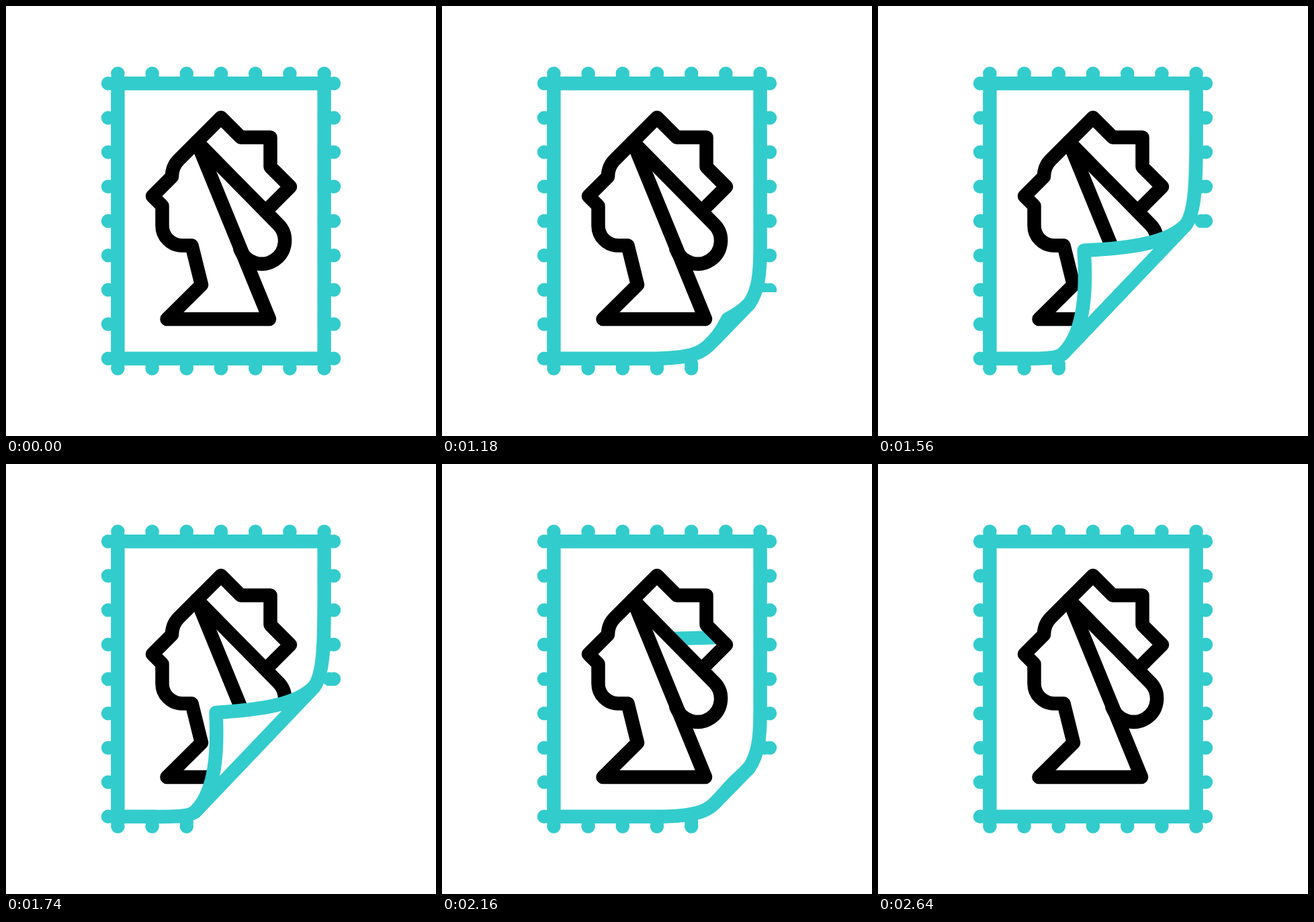
These frames come from a looping animation (640x640 px, 3600 ms). An HTML page without scripts:

```html
<!DOCTYPE html>
<html lang="en">
<head>
<meta charset="utf-8">
<title>Peeling stamp</title>
<style>
  html, body { margin: 0; width: 100%; height: 100%; overflow: hidden; background: #fff; }
  svg { display: block; width: 100%; height: 100%; }

  .line { fill: none; stroke: #3cc; stroke-width: 20.5; stroke-linejoin: round; }
  .perforation { stroke-linecap: round; stroke-dasharray: 0 51.2; }
  .head { stroke: #000; stroke-linecap: round; }
  .flap, .cover { fill: #fff; }

  /* Four poses of the corner: flat, curl, fold, peak */
  .edge {
    --flat: path("M166.4 115.2H473.6V470C473.6 500 473.6 515 473.6 524.8L473.6 524.8C465 524.8 440 524.8 420 524.8H166.4Z");
    --curl: path("M166.4 115.2H473.6V370C473.6 405 471 432 457 452L416 494C398 513 392 525 315 524.8H166.4Z");
    --fold: path("M166.4 115.2H473.6V280C473.6 330 472 352 461 367L318 517C306 528 275 524.8 240 524.8H166.4Z");
    --peak: path("M166.4 115.2H473.6V190C473.6 260 472 305 458 324L273 518C262 526 235 524.8 195 524.8H166.4Z");
  }
  .flap {
    --flat: path("M473.6 524.8C473.6 524.8 473.6 524.8 473.6 524.8C473.6 524.8 473.6 524.8 473.6 524.8Z");
    --curl: path("M457 452C450 460 440 468 435 473C430 478 422 487 416 494Z");
    --fold: path("M461 367C440 390 402 397 347 406C343 450 340 497 318 517Z");
    --peak: path("M458 324C432 350 380 359 305 362C309 420 307 485 273 518Z");
  }
  /* Blank area left behind by the lifted corner */
  .cover {
    --flat: path("M474 512H510V560H484V525Z");
    --curl: path("M460 434H510V560H392V510Z");
    --fold: path("M468 360H510V560H305V524Z");
    --peak: path("M451 332H510V560H281V510Z");
  }

  .peel { d: var(--flat); animation: peel 3.6s linear infinite; }
  .cover { animation: peel 3.6s linear infinite, lifted 3.6s step-end infinite; }
  .band {
    d: path("M342 260L412 258");
    animation: swing 3.6s linear infinite, glimpse 3.6s step-end infinite;
  }

  @keyframes peel {
    0%, 25.83%, 70.56%, 100% { d: var(--flat); }
    32.2% { d: var(--curl); }
    37.78% { d: var(--fold); animation-timing-function: ease-out; }
    44.4% { d: var(--peak); }
    46.1% { d: var(--peak); animation-timing-function: ease-in; }
    52.36% { d: var(--fold); }
    60% { d: var(--curl); }
  }
  @keyframes lifted {
    0%, 70.56%, 100% { visibility: hidden; }
    26.1% { visibility: visible; }
  }
  @keyframes swing {
    0%, 60.1% { d: path("M342 260L412 258"); animation-timing-function: ease-in; }
    73.3%, 100% { d: path("M348 227L451 133"); }
  }
  @keyframes glimpse {
    0%, 73.3%, 100% { visibility: hidden; }
    58.9% { visibility: visible; }
  }
</style>
</head>
<body>
<svg viewBox="0 0 640 640">
  <g class="line">
    <path class="perforation" d="M166.4 100.6H474M166.4 539.4H474M152 115.2V525M488 115.2V525"/>
    <path class="perforation" d="M166.4 107H474M166.4 533H474M159 115.2V525M481 115.2V525"/>
    <path class="band"/>
  </g>
  <g class="line head">
    <path d="M284 202L257 229Q247 239 247 254L218 283L232.5 297.5V327A29.5 29.5 0 0 0 262 356.5H276.5L291 415L239.5 466H392Z"/>
    <path d="M284 202L320 166L349.5 195.5H393.5V239.5L423 269L388 304"/>
    <path d="M284 202L404.6 324.5A34.5 34.5 0 1 1 348.5 362"/>
  </g>
  <path class="cover peel-area"/>
  <path class="line edge peel"/>
  <path class="line flap peel" style="fill:#fff"/>
</svg>
</body>
</html>
```
